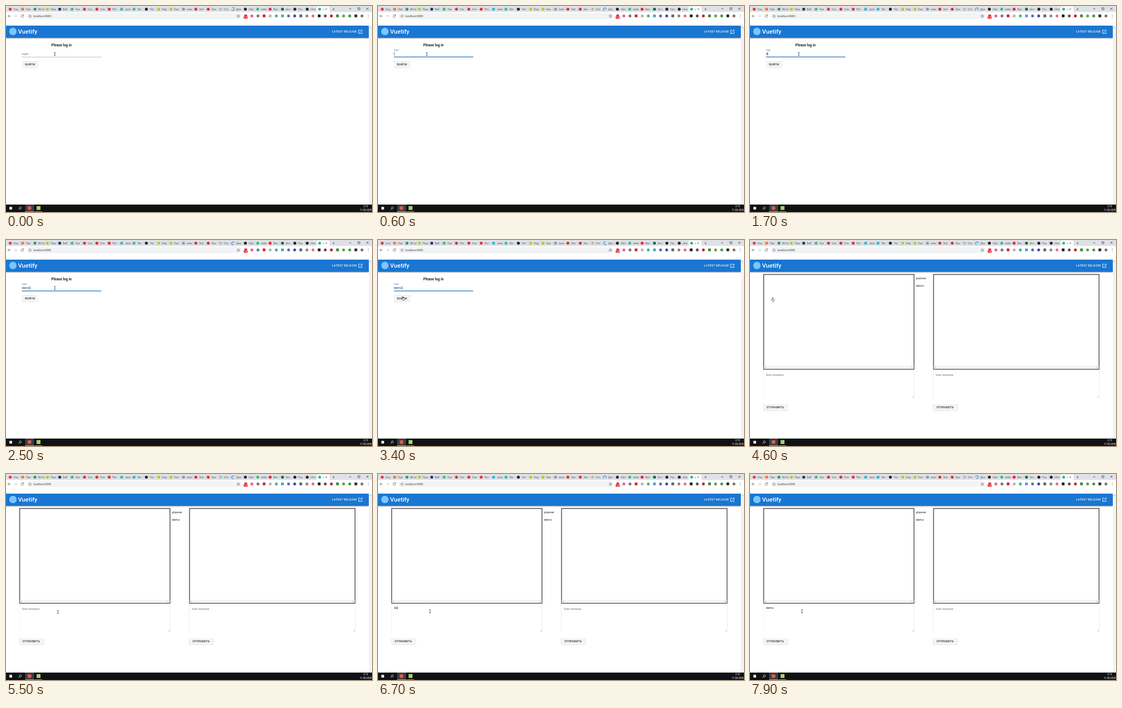
Recreate the animation shown at these times as an HTML page. Size 690 by 388 pixels, loop 8 s.

```html
<!DOCTYPE html>
<html lang="ru">
<head>
<meta charset="utf-8">
<title>Login and chat</title>
<style>
html, body { margin: 0; width: 100%; height: 100%; overflow: hidden; background: #fff; }
svg { display: block; width: 690px; height: 388px; font-family: Roboto, Arial, sans-serif; }
text { white-space: pre; }
.btn, .area { filter: drop-shadow(0 .8px .7px rgba(0,0,0,.35)); }
.bar { filter: drop-shadow(0 1px 1.2px rgba(0,0,0,.4)); }
</style>
</head>
<body>
<svg id="stage" viewBox="0 0 690 388" xmlns="http://www.w3.org/2000/svg"></svg>
<script>
const BLUE = '#1976d2', INK = '#222', GREY = '#757575', WORD = 'demo';
const rect = (x, y, w, h, fill, more = '') =>
  `<rect x="${x}" y="${y}" width="${w}" height="${h}" fill="${fill}" ${more}/>`;
const dot = (x, y, r, fill) => `<circle cx="${x}" cy="${y}" r="${r}" fill="${fill}"/>`;
const text = (x, y, size, str, fill = INK, more = '') =>
  `<text x="${x}" y="${y}" font-size="${size}" fill="${fill}" ${more}>${str}</text>`;
const line = (d, color, w = .8, more = '') =>
  `<path d="${d}" stroke="${color}" stroke-width="${w}" fill="none" ${more}/>`;
const button = (x, y, w, label, inner = '') =>
  rect(x, y, w, 12.6, '#f5f5f5', 'rx="1.4" class="btn"') + inner +
  text(x + 6, y + 8.2, 5, label, INK, 'font-weight="500" letter-spacing=".46"');

function tabs() {
  const names = 'Соц Пре ВСта Паш Веб Vue Соз Оче Руч Java Лат Что Код Как save Зап Зан Ста Док vfpn seda Бел Хоч You char v'.split(' ');
  const colors = ('#e33 #f27a2a #3a9a63 #b8cc1c #173c66 #41b883 #d33 #d33 #d33 #35b5d0 #35b5d0 #222 ' +
    '#b8cc1c #b8cc1c #999 #d33 #d33 #bbb none #222 #41b883 #e23 #176b3a #222 #222 #41b883').split(' ');
  let out = rect(0, 0, 690, 11.5, '#dee1e6') +
    rect(586, 1, 24, 11, '#fff', 'rx="2"');
  names.forEach((name, i) => {
    const x = 8 + i * 23.33;
    if (i && i < 25) out += line(`M${x - 5} 3V9`, '#b4b8bd', .4);
    out += dot(x, 6, 2.8, colors[i]) + text(x + 6, 7.9, 5, name, '#555');
  });
  return out + line('M602 4.2l3.4 3.4m0-3.4l-3.4 3.4M615.3 6h4.4M617.5 3.8v4.4', '#555', .7) +
    line('M647 5.5h4M663.5 3.3h3.6v3.6h-3.6zM679.3 3.2l4 4m0-4l-4 4', '#222', .7) +
    line('M426.4 3.4a2.7 2.7 0 1 1-1 3.6', '#2f80d8', 1.1, 'id="spin"');
}

function toolbar() {
  const colors = ('#e53935 #e9609a #777 #d32f2f #b5b5b5 #41b883 #5e9bd6 #5475a0 #4548b5 #666 #888 ' +
    '#e57373 #222 #555 #c62828 #388e3c #6d9c4b #43a047 #333 #80756a').split(' ');
  let out = rect(0, 11.5, 690, 25.5, '#fff') + rect(39, 13.3, 405, 11.4, '#f1f3f4', 'rx="5.7"') +
    line('M8.7 19H3.6m2.3-2.4L3.5 19l2.4 2.4', '#555') +
    line('M15.3 19h5.1m-2.3-2.4l2.4 2.4l-2.4 2.4', '#bbb') +
    line('M32.6 17.3a2.4 2.4 0 1 0 .6 2.4M33.4 16v2h-2', '#555') +
    line('M45.3 16.7a2.3 2.3 0 1 0 .01 0M45.3 18.5v2', '#555', .6) +
    text(51.5, 20.9, 5.1, 'localhost:8080', '#444') +
    line('M438 16.2l.8 1.9 2 .1-1.6 1.3.6 2-1.8-1.1-1.8 1.1.6-2-1.6-1.3 2-.1z', '#555', .6);
  colors.forEach((c, i) => {
    const x = 452 + i * 11.53;
    out += i % 3 ? dot(x, 18.7, 2.7, c) : rect(x - 2.6, 16.1, 5.2, 5.2, c, 'rx=".6"');
  });
  out += rect(448, 19.4, 8, 4.6, '#e53935', 'rx="1"') + text(449.6, 23.1, 3.8, '120', '#fff');
  return out + [16.6, 18.8, 21].map(y => dot(683, y, .6, '#555')).join('');
}

function appBar() {
  return rect(0, 37, 684, 23, BLUE, 'class="bar"') + dot(13, 48, 7, '#7bc6ff') +
    text(22.8, 52.3, 11.5, 'Vuetify', '#fff', 'font-weight="500"') +
    text(614.8, 50.4, 5.1, 'LATEST RELEASE', '#fff', 'font-weight="500" letter-spacing=".48"') +
    line('M667.5 45.3h-2.7v6.4h6.4v-2.7M669 45.3h2.3v2.3M671 45.6l-3.9 3.9', '#fff', .9) +
    rect(684, 37, 6, 337, '#f3f3f3') + line('M685.6 41.5l1.4-1.6l1.4 1.6', '#777', .7);
}

function taskbar() {
  return rect(0, 374, 690, 14, '#0f1114') + rect(6.4, 378.4, 5, 5, '#fff') +
    line('M27.2 378.4a1.9 1.9 0 1 0 .01 0M25.6 381.6l-2.3 2.3', '#fff', .8) +
    rect(36, 374, 17, 14, '#3a3e43') + dot(44.3, 380.6, 3.7, '#e0584a') +
    rect(57.6, 376.8, 7.4, 7.4, '#a9cf5d') +
    rect(36, 387, 17, 1, '#76b9ed') + rect(54, 387, 14, 1, '#76b9ed') +
    text(678, 379.4, 4.5, '2:15', '#fff', 'text-anchor="middle"') +
    text(678, 386, 4.5, '11.08.2020', '#fff', 'text-anchor="middle"');
}

function loginPage() {
  return text(104.5, 75.6, 6.7, 'Please log in', INK, 'font-weight="700" text-anchor="middle"') +
    line('M30 96.2H179.5', '#8a8a8a', .6) + rect(30, 95.4, 149.5, 1.1, BLUE, 'id="focus"') +
    text(30, 92, 5.7, 'login', GREY, 'id="label"') + text(30, 92, 5.8, '', INK, 'id="login"') +
    `<clipPath id="clip">${rect(30, 104.2, 31, 12.6, '#000', 'rx="1.4"')}</clipPath>` +
    button(30, 104.2, 31, 'ВОЙТИ', '<circle id="ripple" cx="43" cy="112" fill="#969696" clip-path="url(#clip)"/>');
}

function panel(x, w, hintId, textId) {
  return rect(x + .6, 65, w - 1, 178.4, '#fff', 'stroke="#222" stroke-width="1.2"') +
    rect(x + 1.2, 237, w - 2.2, 5.8, '#f3f3f3') +
    line(`M${x + 4.8} 238.6l-1.4 1.4l1.4 1.4M${x + w - 4.8} 238.6l1.4 1.4l-1.4 1.4`, '#888', .7) +
    rect(x, 246, w, 52, '#fff', 'rx="1.4" class="area"') +
    line(`M${x + w - 1} 294l-3 3m3-1.4l-1.4 1.4`, '#888', .5) +
    text(x + 4.7, 255.8, 5.7, 'Solo textarea', GREY, `id="${hintId}"`) +
    text(x + 4.7, 254.3, 5.8, '', INK, `id="${textId}"`) +
    button(x, 309, 46, 'ОТПРАВИТЬ');
}

const $ = id => document.getElementById(id);
$('stage').innerHTML = rect(0, 0, 690, 388, '#fff') + tabs() + toolbar() + appBar() +
  `<g id="loginPage">${loginPage()}</g>` +
  `<g id="chatPage">${panel(25.2, 284.4, 'hint', 'message')}${panel(345.4, 313, 'hint2', 'message2')}` +
  text(313, 73.6, 5.8, 'planner') + text(313, 87.6, 5.8, WORD) + '</g>' +
  rect(0, 0, .6, 6.6, INK, 'id="caret"') + taskbar() +
  `<g id="beam">${line('M-1.6-2.8h3.2M0-2.8v5.6M-1.6 2.8h3.2', '#222', .7)}</g>` +
  '<path id="hand" d="M-1-3.4h1.2v2.6l2.6.7-.5 3.6h-2.9L-2.6.9l.8-.6.8.7z" fill="#fff" stroke="#111" stroke-width=".6"/>';

const clamp = v => Math.min(1, Math.max(0, v));
const ease = p => 1 - (1 - p) ** 2;
const ramp = (t, from, to) => ease(clamp((t - from) / (to - from)));
const show = (id, on) => $(id).setAttribute('visibility', on ? 'visible' : 'hidden');
const set = (id, attrs) => { for (const k in attrs) $(id).setAttribute(k, attrs[k]); };

const FOCUS = 150, PRESS = 3750, SWITCH = 4300, CHAT_FOCUS = 5600;
const loginKeys = [1600, 1900, 2100, 2300], chatKeys = [6450, 6700, 6950, 7200];

// Types the word and returns the time of the last caret reset.
function type(id, keys, start, t) {
  const done = keys.filter(k => k <= t);
  $(id).textContent = WORD.slice(0, done.length);
  return done.length ? done[done.length - 1] : start;
}

function placeCaret(id, reset, from, to, t) {
  const el = $(id), base = +el.getAttribute('y');
  set('caret', {
    x: +el.getAttribute('x') + (el.textContent ? el.getComputedTextLength() : 0) + .2,
    y: base - 5.4
  });
  show('caret', t >= from && t < to && (t - reset) % 1000 < 500);
}

function render(t) {
  const chat = t >= SWITCH;
  $('loginPage').style.display = chat ? 'none' : '';
  $('chatPage').style.display = chat ? '' : 'none';
  set('spin', { transform: `rotate(${t * .36} 427.9 6)` });

  const float = ramp(t, FOCUS, FOCUS + 300);
  set('label', {
    y: 92 - 8 * float, 'font-size': 5.7 - 1.4 * float,
    fill: t > FOCUS ? BLUE : GREY
  });
  const width = 149.5 * float * (1 - ramp(t, PRESS, PRESS + 300));
  set('focus', { x: 104.75 - width / 2, width });
  set('ripple', { r: 22 * ramp(t, PRESS, PRESS + 240) });

  const loginReset = type('login', loginKeys, FOCUS, t);
  const chatReset = type('message', chatKeys, CHAT_FOCUS, t);
  show('hint', t < chatKeys[0]);
  if (chat) placeCaret('message', chatReset, CHAT_FOCUS, 8000, t);
  else placeCaret('login', loginReset, FOCUS, PRESS, t);

  const toButton = ramp(t, 3050, 3550), toArea = ramp(t, 4700, 5350);
  const x = 92 - 49 * toButton + 55 * toArea;
  const y = 90.4 + 21.6 * toButton + 148 * toArea - 1.4 * ramp(t, 5550, 5700);
  const overButton = t > 3400 && t < 4750;
  for (const id of ['beam', 'hand']) set(id, { transform: `translate(${x} ${y})` });
  show('hand', overButton);
  show('beam', !overButton);
}

function frame(now) {
  render(now % 8000);
  requestAnimationFrame(frame);
}
render(0);
requestAnimationFrame(frame);
</script>
</body>
</html>
```
